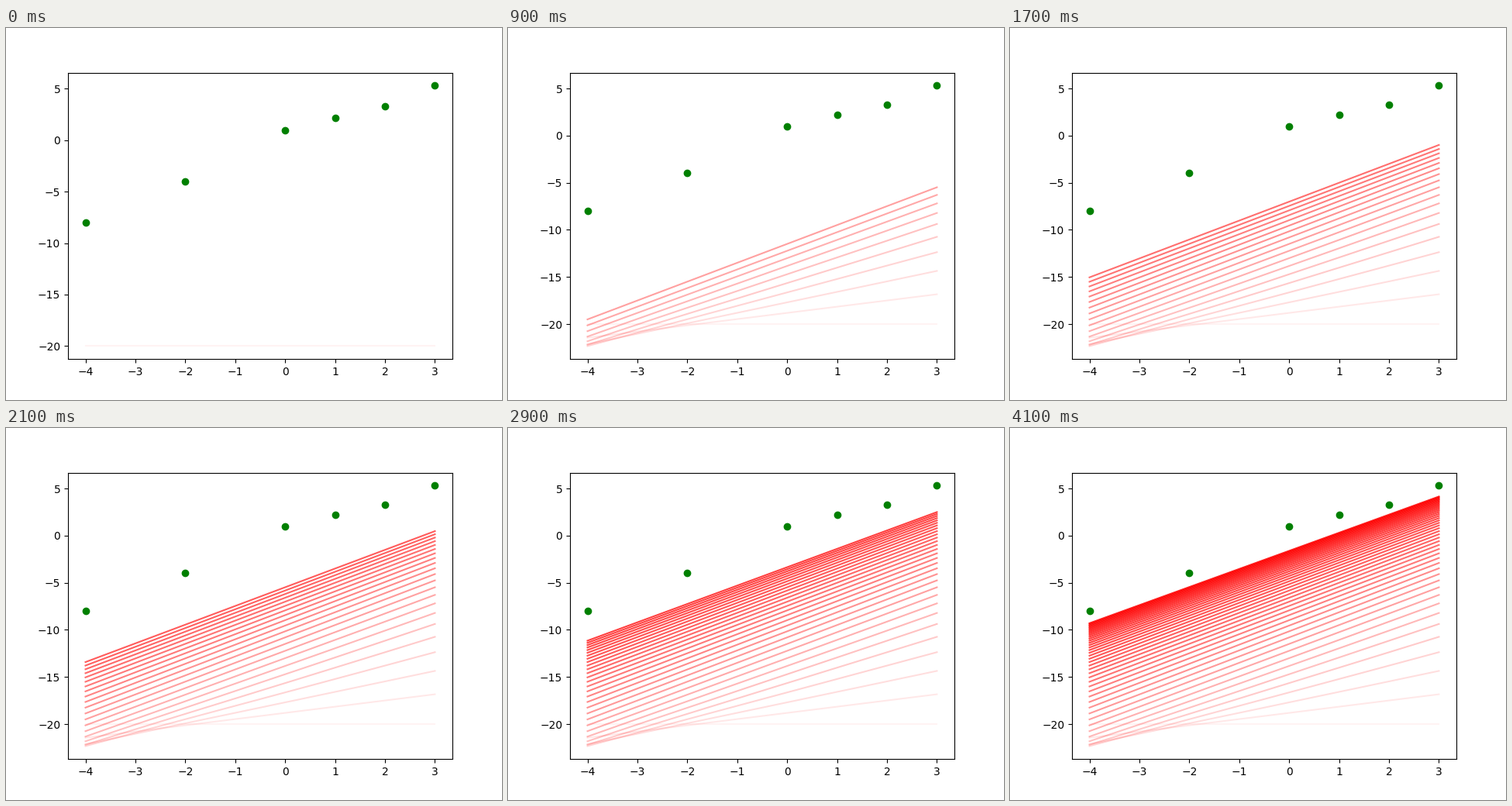
A matplotlib script for the animation above (4.2 s loop, 640x480 px).

```python
import math

import matplotlib.pyplot as plt
import numpy as np
from matplotlib.animation import FuncAnimation

FRAMES = 42
RATE = 0.01
MARGIN = 0.05

xs = np.array([-4, -2, 0, 1, 2, 3], dtype=float)
ys = np.array([-8, -4, 1, 2.2, 3.3, 5.3])


def train_epoch(bias, slope):
    """One pass of stochastic gradient descent over all points."""
    for x, y in zip(xs, ys):
        error = bias + slope * x - y
        bias -= RATE * error
        slope -= RATE * error * x
    return bias, slope


def fit_history():
    bias, slope = -20.0, 0.0
    fits = []
    for _ in range(FRAMES):
        fits.append(bias + slope * xs)
        bias, slope = train_epoch(bias, slope)
    return fits


def padded(low, high):
    pad = MARGIN * (high - low)
    return low - pad, high + pad


def opacity(epoch):
    return 1 - math.exp(-(epoch + 1) / 21.5)


fits = fit_history()
lows = np.minimum.accumulate([fit.min() for fit in fits])

fig, ax = plt.subplots(figsize=(6.4, 4.8), dpi=100)
ax.plot(xs, ys, "o", color="green")
lines = [ax.plot(xs, fit, color="red", alpha=opacity(i))[0]
         for i, fit in enumerate(fits)]
ax.set_xlim(*padded(xs.min(), xs.max()))


def update(frame):
    for i, line in enumerate(lines):
        line.set_visible(i <= frame)
    ax.set_ylim(*padded(lows[frame], ys.max()))
    return lines


anim = FuncAnimation(fig, update, frames=FRAMES, interval=100,
                     repeat=True, repeat_delay=0, blit=False)
plt.show()
```
